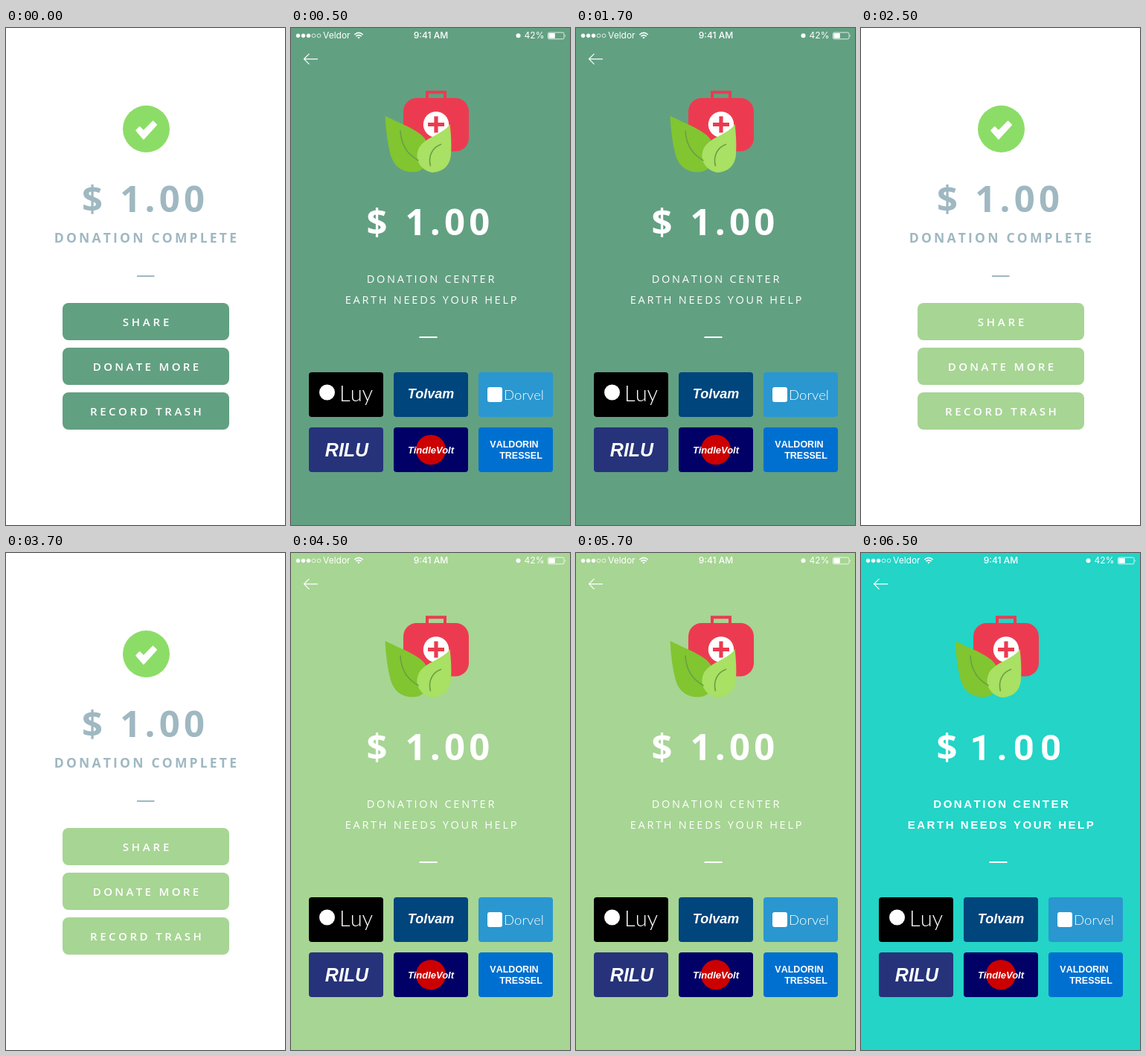
These frames come from a looping animation (375x667 px, 8 s). An HTML page:

```html
<!DOCTYPE html>
<html lang="en">
<head>
<meta charset="utf-8">
<title>Donation screens</title>
<style>
  html, body { margin: 0; width: 100%; height: 100%; overflow: hidden; background: #fff; }
  svg { display: block; width: 100%; height: 100%; }
  text { font-family: "Open Sans", "Noto Sans", sans-serif; font-kerning: none; fill: #fff; }
  .mid { text-anchor: middle; }
  .bar text { font: 400 12px Inter, Roboto, sans-serif; }
  .bar .clock { font-weight: 500; }
  .price { font-size: 49px; font-weight: 700; letter-spacing: 5.3px; }
  .grey, .grey text { fill: #9fb8c1; }
  .label { font-size: 15px; font-weight: 600; }
  .title { font-size: 14.5px; font-weight: 500; letter-spacing: 2.75px; }
  .round text { font-family: "Liberation Sans", Arial, sans-serif; font-weight: 700; }
  .round .title { font-size: 15px; letter-spacing: 2.55px; }
  .round .digits { font-family: Roboto, sans-serif; font-size: 49px; letter-spacing: 8px; }
  .slant { font: italic 700 16px "Liberation Sans", Arial, sans-serif; }
  .thin { font-family: Lato, "Open Sans", sans-serif; font-weight: 300; }
</style>
</head>
<body>
<svg viewBox="0 0 375 667" preserveAspectRatio="none">
  <g id="done">
    <rect width="375" height="667" fill="#fff"/>
    <circle cx="188.5" cy="135.5" r="31.5" fill="#8cdd67"/>
    <path d="M175 137.5l4.7-4.7 5.2 5.2 12.6-12.8 4.7 4.7-17.3 19z" fill="#fff" stroke="#fff" stroke-width="1.6" stroke-linejoin="round"/>
    <g class="grey">
      <text class="price" x="102" y="247" xml:space="preserve">$ 1.00</text>
      <text class="mid" x="189" y="288.3" font-size="17.5" font-weight="700" letter-spacing="3.2">DONATION COMPLETE</text>
      <rect x="176" y="332" width="23.5" height="2"/>
    </g>
    <g id="buttons"></g>
  </g>

  <g id="pay">
    <rect id="back" width="375" height="667"/>
    <g class="bar">
      <g id="signal" stroke="#fff" stroke-width=".8"></g>
      <text x="43" y="14.3">Veldor</text>
      <g fill="none" stroke="#fff" stroke-width="1.6">
        <path d="M85.3 9Q91 3.8 96.7 9M87.3 11.2Q91 7.9 94.7 11.2"/>
        <path d="M89.2 12.6Q91 11.2 92.8 12.6L91 14.6z" fill="#fff" stroke="none"/>
      </g>
      <text class="clock mid" x="188" y="14.3">9:41 AM</text>
      <circle cx="305.5" cy="10.3" r="3" fill="#fff"/>
      <text class="mid" x="327" y="14.3">42%</text>
      <rect x="345.5" y="6" width="21.5" height="8.8" rx="1.8" fill="none" stroke="#fff" stroke-width=".8"/>
      <path d="M346.5 7h8.3v6.8h-8.3zM368 9q1.6 1.4 0 2.8z" fill="#fff"/>
    </g>
    <path d="M36 41.6H18M24.5 34.6L17.5 41.6L24.5 48.6" fill="none" stroke="#fff" stroke-width="1.3"/>

    <path d="M183 97V86.3H207V97" fill="none" stroke="#ec3b50" stroke-width="4"/>
    <rect x="151" y="94" width="88" height="71.5" rx="18" fill="#ec3b50"/>
    <circle cx="195" cy="129.5" r="17.2" fill="#fff"/>
    <path d="M184 129.5h22M195 118.5v22" stroke="#ec3b50" stroke-width="5.2"/>
    <path d="M126.5 118Q128 149 134 171C139 187 151 195 168 193C186 190 190 166 181 150C174 138 151 130 126.5 118Z" fill="#81c530"/>
    <path d="M213.5 129C205 143 180 146 172 161C165 175 173 191 190 194C205 193 214 184 215 170C216 155 215 142 213.5 129Z" fill="#a8e163"/>
    <g fill="none" stroke="#6a9f45" stroke-width="1.6">
      <path d="M147 137.5Q148 165 171.5 178"/>
      <path d="M202 156C190 160 184 172 187.5 185.5"/>
    </g>

    <text class="price" x="101.5" y="277.5">$</text>
    <g id="plain">
      <text class="price" x="153.4" y="277.5">1.00</text>
      <text class="title mid" x="188.9" y="342.1">DONATION CENTER</text>
      <text class="title mid" x="189.4" y="370.1">EARTH NEEDS YOUR HELP</text>
    </g>
    <g id="bold" class="round">
      <text class="digits" x="146.5" y="277.5">1.00</text>
      <text class="title mid" x="189.3" y="342.2">DONATION CENTER</text>
      <text class="title mid" x="189" y="370.2">EARTH NEEDS YOUR HELP</text>
    </g>
    <rect x="172.5" y="414" width="24" height="2" fill="#fff"/>

    <g id="cards"></g>
    <circle cx="48.5" cy="489" r="10.5" fill="#fff"/>
    <text class="thin" x="65" y="500.5" font-size="29">Luy</text>
    <text class="slant mid" x="188" y="497" style="font-size:18px">Tolvam</text>
    <rect x="264" y="482" width="20" height="20" rx="3" fill="#fff"/>
    <text class="thin" x="286" y="498.5" font-size="18.5">Dorvel</text>
    <text class="slant mid" x="75" y="575" style="font-size:25px">RILU</text>
    <circle cx="188" cy="566" r="20" fill="#cc0000"/>
    <text class="slant mid" x="188" y="570.5" style="font-size:13px">TindleVolt</text>
    <g class="round" font-size="12.5">
      <text class="mid" x="300" y="563">VALDORIN</text>
      <text class="mid" x="309" y="577.5">TRESSEL</text>
    </g>
  </g>
</svg>
<script>
const $ = id => document.getElementById(id);

function add(parent, name, attrs, text = "") {
  const el = document.createElementNS("http://www.w3.org/2000/svg", name);
  for (const key in attrs) el.setAttribute(key, attrs[key]);
  el.textContent = text;
  parent.append(el);
}

const buttons = [["SHARE", 3.8], ["DONATE MORE", 3.35], ["RECORD TRASH", 3.5]];
buttons.forEach(([label, gap], i) => {
  const y = 369 + i * 60;
  add($("buttons"), "rect", { x: 76, y, width: 224, height: 50, rx: 8 });
  add($("buttons"), "text", {
    class: "label mid", x: 188 + gap / 2, y: y + 31, "letter-spacing": gap
  }, label);
});

for (let i = 0; i < 5; i++) {
  add($("signal"), "circle", { cx: 9.5 + i * 7, cy: 10.3, r: 2.4, fill: i < 3 ? "#fff" : "none" });
}

const cardColors = ["#000", "#00457c", "#2a97d0", "#26337a", "#000066", "#0070d0"];
cardColors.forEach((fill, i) => add($("cards"), "rect", {
  x: 24 + (i % 3) * 114, y: i < 3 ? 462 : 536, width: 100, height: 60, rx: 4, fill
}));

// start time, screen, theme colour, rounded lettering
const loop = 8000;
const steps = [
  [0, "done", "#62a082"],
  [500, "pay", "#62a082"],
  [2500, "done", "#a7d594"],
  [4500, "pay", "#a7d594"],
  [6500, "pay", "#23d4c7", true]
];

const show = (id, on) => { $(id).style.display = on ? "" : "none"; };
const start = performance.now();
let current;

function draw(now) {
  const t = Math.max(0, now - start) % loop;
  const step = steps.findLast(s => s[0] <= t);
  if (step !== current) {
    const [, screen, color, rounded] = current = step;
    show("done", screen === "done");
    show("pay", screen === "pay");
    show("plain", !rounded);
    show("bold", rounded);
    $("buttons").setAttribute("fill", color);
    $("back").setAttribute("fill", color);
  }
  requestAnimationFrame(draw);
}
draw(start);
</script>
</body>
</html>
```
